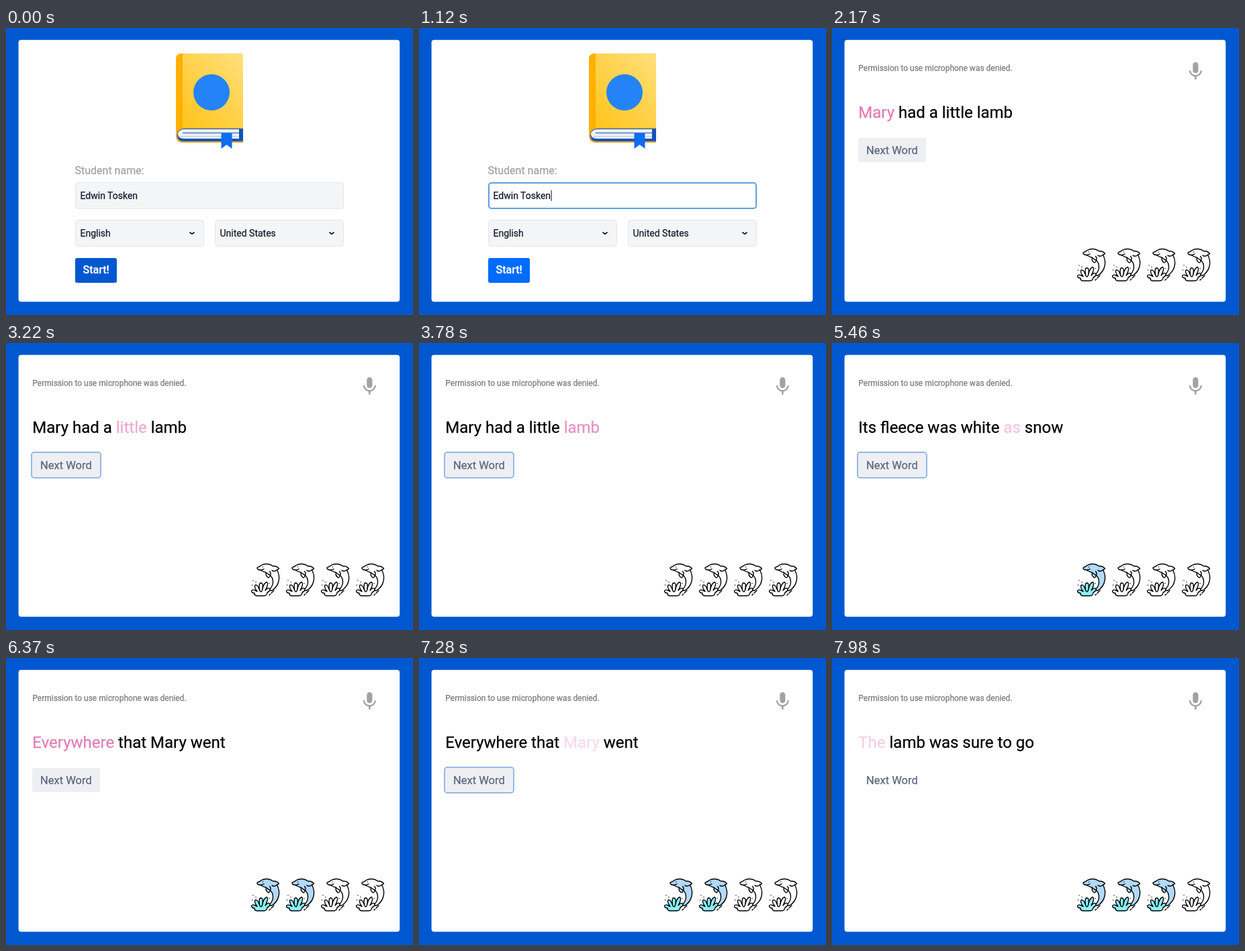
Animation of 606x428 px, one loop 8 s. Source, as an HTML page:

```html
<!DOCTYPE html>
<html lang="en">
<head>
<meta charset="utf-8">
<title>Reading practice</title>
<style>
  html, body { margin: 0; width: 100%; height: 100%; overflow: hidden; background: #0058d0; }
  svg { display: block; font-family: Roboto, sans-serif; }
  text { white-space: pre; }
  text, tspan { fill: currentColor; stroke: currentColor; stroke-width: 0.25; }
  .field { fill: #f4f5f7; stroke: #e3e5e9; }
  .value { font-size: 14px; color: #191b30; }
  .chevron { fill: none; stroke: #191b30; stroke-width: 1.8; stroke-linecap: round; stroke-linejoin: round; }
  .ink { stroke: #000; stroke-width: 1.4; stroke-linecap: round; stroke-linejoin: round; }
</style>
</head>
<body>
<svg width="606" height="428" viewBox="0 0 606 428">
  <defs>
    <linearGradient id="cover" x1="1" y1="0" x2="0.1" y2="1">
      <stop offset="0" stop-color="#ffe07c"/>
      <stop offset="1" stop-color="#ffc31a"/>
    </linearGradient>
  </defs>
  <rect width="606" height="428" fill="#0058d0"/>
  <rect x="18.600" y="17.800" width="567.600" height="390.400" rx="4" fill="#fff"/>

  <g id="form">
    <!-- book -->
    <path d="M262 38H353V152H253V47Q253 38 262 38Z" fill="url(#cover)"/>
    <path d="M262 38H263V150Q253 151 253 161V47Q253 38 262 38Z" fill="#ffb000"/>
    <path d="M353 149H264Q253 150 253 160Q253 171 264 171H353Z" fill="#ffa51f"/>
    <path d="M353 150H265Q255 151 255 160Q255 169 265 169H353Z" fill="#0b55bd"/>
    <path d="M347 151H265Q256 152 256 158.500Q256 165 265 165H347Z" fill="#eef0f5"/>
    <path d="M263 156.500H347" stroke="#4a7fc4" stroke-width="1.500"/>
    <path d="M259 162H347" stroke="#c9d2e2" stroke-width="1.500"/>
    <path d="M320.500 157H336.500V180L328.500 174L320.500 180Z" fill="#0c6cf2"/>
    <circle cx="306" cy="96" r="27" fill="#2583f8"/>

    <text x="102.500" y="218" font-size="16" color="#a2a2a2">Student name:</text>
    <rect class="field" x="103.500" y="230.500" width="399" height="39" rx="4"/>
    <rect id="focus" x="104" y="231" width="398" height="38" rx="4" fill="#fff" stroke="#5f9fe0" stroke-width="2"/>
    <text id="name" class="value" x="110.500" y="255">Edwin Tosken</text>
    <rect id="caret" y="242" width="1" height="16" fill="#111"/>
    <rect class="field" x="103.500" y="286.500" width="191" height="39" rx="4"/>
    <rect class="field" x="311.500" y="286.500" width="191" height="39" rx="4"/>
    <text class="value" x="110.500" y="311">English</text>
    <text class="value" x="318.500" y="311">United States</text>
    <path class="chevron" d="M274 305L277 307.200L280 305M482 305L485 307.200L488 305"/>
    <rect id="start" x="103" y="343" width="62" height="37" rx="3"/>
    <text x="114.500" y="366" font-size="16" font-weight="500" color="#fff">Start!</text>
  </g>

  <g id="reader">
    <text x="39.300" y="64" font-size="12" color="#7a7a7a">Permission to use microphone was denied.</text>
    <path transform="translate(525 48.300) scale(1.360)" fill="#a2a2a2" d="M12 14c1.660 0 3-1.340 3-3V5c0-1.660-1.340-3-3-3S9 3.340 9 5v6c0 1.660 1.340 3 3 3zm5.300-3c0 3-2.540 5.100-5.300 5.100S6.700 14 6.700 11H5c0 3.410 2.720 6.230 6 6.720V21h2v-3.280c3.280-.48 6-3.300 6-6.720z"/>
    <text id="line" x="39.300" y="134" font-size="24"></text>
    <rect id="next" x="39" y="164" width="101" height="36" rx="3" fill="#eeeff3"/>
    <rect id="ring" x="38" y="163" width="103" height="38" rx="4" fill="none" stroke="#95b9e6" stroke-width="2"/>
    <text x="51" y="188" font-size="16.500" color="#5a667b">Next Word</text>
    <g id="dolphins"></g>
  </g>
</svg>
<script>
const $ = id => document.getElementById(id);
const LOOP = 8000, FOCUS = 910, HOVER = 1000, PRESS = 1540, READ = 1610;

// Each line of the rhyme with the time at which each word lights up.
const lines = [
  ["Mary had a little lamb", [READ, 2520, 2680, 2900, 3360]],
  ["Its fleece was white as snow", [3800, 4270, 4600, 4920, 5240, 5560]],
  ["Everywhere that Mary went", [5880, 6860, 7140, 7440]],
  ["The lamb was sure to go", [7790]]
];

const dolphin = x => `<g class="ink" transform="translate(${x} 328)">
  <path class="body" d="M10 8Q9.500 6.500 12 6Q14 5.500 16 3.500Q20 1.200 25 1.500Q30 1.800 33.500 4.800Q39 4 42.500 8.500Q41 10 39.500 10.200
    Q44 19 42 27Q40 36 32 41Q29 42 28 40Q33 35 33.500 29Q33.500 22 29.500 18.500
    Q29 21.500 26.500 22Q22 19 23.500 14.500Q18 12.500 14.500 10.500Q11 10.500 10 8Z"/>
  <path d="M14.500 10.500Q18 10.500 20 9M23.500 14.500Q26.500 17 29.500 18.500Q31 15 28.500 12.500M32 11Q35 14 39.500 10.200" fill="none"/>
  <path d="M18.500 6V6.100M4 26V26.100M8 28.500V28.600M28 30.500V30.600M2.500 33V33.100M31 45L35 41M28 48L29.500 46.500" fill="none"/>
  <path class="splash" d="M9 49Q5.500 48 6 45Q1.500 45 1.500 41.500Q3 39 7 41L10 42.500
    Q5 36 7 33Q10.500 32 12.500 38L13.500 40Q12 30 15.500 29.800Q19.500 30 17.800 39
    Q20 29.500 24.500 28.500Q27.500 31 22 41Q26 36 29 38.500Q29.500 42 25 44Q24.500 49 20 49Z"/>
  <path d="M13.500 40Q14 43 16 43Q17.500 42 17.800 39" fill="none"/>
</g>`;
$("dolphins").innerHTML = [364, 416, 468, 520].map(dolphin).join("");
const icons = [...$("dolphins").children];

const ramp = (t, from, length) => Math.max(0, Math.min(1, (t - from) / length));
const show = (id, on) => $(id).style.display = on ? "" : "none";

function drawForm(t) {
  const focused = t >= FOCUS && t < PRESS;
  $("focus").setAttribute("opacity", focused ? ramp(t, FOCUS - 70, 200) : 0);
  $("caret").setAttribute("x", 111 + $("name").getComputedTextLength());
  show("caret", focused && (t - FOCUS) % 980 < 490);
  const h = t < PRESS ? ramp(t, HOVER, 100) : 0;
  $("start").setAttribute("fill", `rgb(0 ${88 + 20 * h} ${208 + 47 * h})`);
}

let shown = "";
function drawReader(t) {
  const row = lines.findLastIndex(([, times]) => t >= times[0]);
  const [words, times] = lines[row];
  const word = times.findLastIndex(at => t >= at);
  if (shown !== words) {
    shown = words;
    $("line").innerHTML = words.split(" ").map(w => `<tspan>${w}</tspan>`).join(" ");
  }
  const pink = `color-mix(in srgb, #e27bb4 ${100 * ramp(t, times[word], 500)}%, white)`;
  [...$("line").children].forEach((span, i) => span.style.color = i === word ? pink : "#000");
  $("next").setAttribute("opacity", ramp(t, times[0] + 240, 140));
  show("ring", word > 0);
  icons.forEach((icon, i) => {
    icon.querySelector(".body").setAttribute("fill", i < row ? "#b2d9fb" : "#fff");
    icon.querySelector(".splash").setAttribute("fill", i < row ? "#8af2f8" : "#fff");
  });
}

const began = performance.now();
function frame() {
  const t = (performance.now() - began) % LOOP;
  show("form", t < READ);
  show("reader", t >= READ);
  t < READ ? drawForm(t) : drawReader(t);
  requestAnimationFrame(frame);
}
frame();
</script>
</body>
</html>
```
